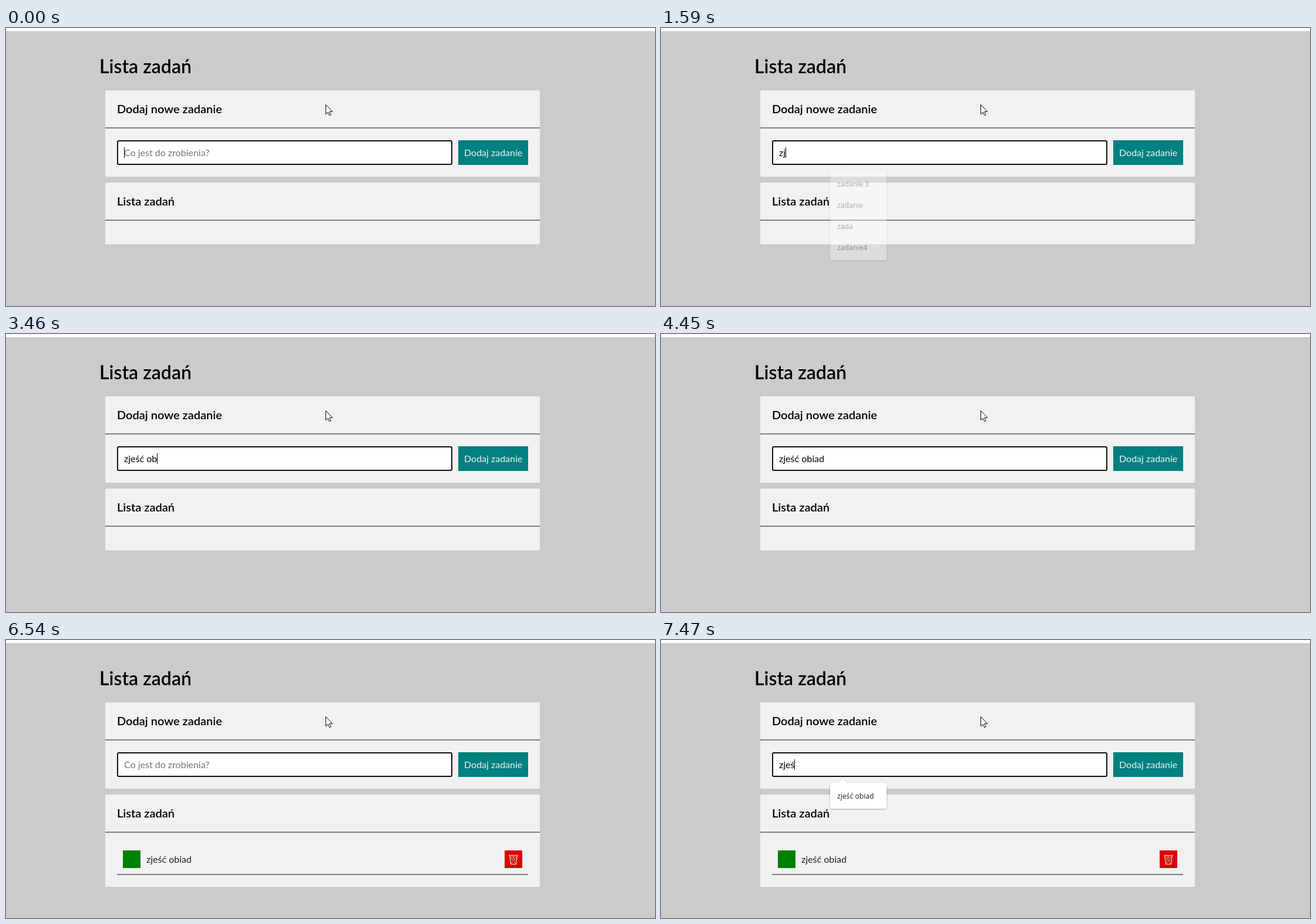
An HTML page for the animation above (8 s loop, 1105 by 473 pixels).

```html
<!DOCTYPE html>
<html lang="pl">
<head>
<meta charset="utf-8">
<title>Lista zadań</title>
<style>
  html, body { margin: 0; width: 100%; height: 100%; overflow: hidden; background: #cbcbc9; }
  svg { display: block; width: 1105px; height: 473px; }
  text { font: 16px Lato, sans-serif; white-space: pre; }
  .head { font-weight: 600; font-size: 20px; }
  .title { font-size: 32px; }
  .card { fill: #f1f1f1; }
  .line { fill: #808080; }
  .menu { filter: drop-shadow(0 1px 1.5px rgba(0, 0, 0, .32)); }
  .menu path, .menu rect { fill: #fff; }
  #items text { font: 12.2px "Open Sans", "Noto Sans", sans-serif; fill: #222; }
</style>
</head>
<body>
<svg viewBox="0 0 1105 473">
  <rect width="1105" height="473" fill="#cbcbc9"/>
  <rect width="1105" height="5" fill="#fff"/>
  <rect y="5" width="1105" height="1" fill="#dededd"/>
  <text class="head title" x="159" y="77">Lista zadań</text>

  <rect class="card" x="169" y="106" width="740" height="147" rx="2"/>
  <text class="head" x="189" y="145">Dodaj nowe zadanie</text>
  <rect class="line" x="169" y="169" width="740" height="2"/>
  <rect x="190" y="192" width="569" height="40" rx="2" fill="#fff" stroke="#101010" stroke-width="2"/>
  <text id="hint" x="201" y="218" fill="#757575">Co jest do zrobienia?</text>
  <text id="typed" x="201" y="218"></text>
  <rect id="caret" y="203" width="1" height="18"/>
  <rect x="770" y="191" width="119" height="42" fill="#008080"/>
  <text x="780" y="218" fill="#f1f1f1">Dodaj zadanie</text>

  <rect id="list" class="card" x="169" y="263" width="740" height="105" rx="2"/>
  <text class="head" x="189" y="302">Lista zadań</text>
  <rect class="line" x="169" y="326" width="740" height="2"/>
  <g id="task">
    <rect x="199" y="358" width="30" height="30" fill="#008000"/>
    <text x="239" y="379" fill="#222">zjeść obiad</text>
    <rect x="849" y="358" width="30" height="30" fill="#dd0000"/>
    <g fill="none" stroke="#d3b9a8">
      <path d="M856 366.5h16M857.5 367l2 14.5h9l2-14.5" stroke-width="1.3"/>
      <path d="M858 368l10 12M862 367l7 9M866 367l4 5M870 368l-10 12M866 367l-7 9M862 367l-4 5M859 378l3 3M869 378l-3 3" stroke-width=".9"/>
    </g>
    <rect class="line" x="189" y="398" width="700" height="2"/>
  </g>

  <g id="menu" class="menu">
    <path d="M301 243.5l8.5-8 8.5 8z"/>
    <rect id="panel" x="288" y="243" width="96" rx="3"/>
    <g id="items"></g>
  </g>

  <path d="M544.5 130.5v16.2l3.7-3.5 2.5 5.6 2.5-1.1-2.5-5.4h5.1z" fill="#fff" stroke="#000"/>
</svg>
<script>
const LOOP = 8000;
const TASK = "zjeść obiad";
const OLD = ["zadanie 3", "zadanie", "zada", "zadanie4"];
const ALL = [...OLD, TASK];
const ADDED_AT = 4870;

// [start ms, typed letters, caret shown, suggestions, menu opacity]
const STEPS = [
  [0, 0, 1], [470, 0, 0], [990, 0, 1],
  [1400, 1, 1, OLD, 1], [1520, 2, 1, OLD, .7], [1590, 2, 1, OLD, .35],
  [1660, 2, 1], [1730, 3, 1],
  [2190, 4, 1], [2250, 5, 1], [2860, 5, 0], [2910, 6, 1], [3180, 7, 1],
  [3460, 8, 1], [3580, 9, 1], [3720, 10, 1], [3910, 11, 1], [4450, 11, 0],
  [ADDED_AT, 0, 0], [5020, 0, 1], [5450, 0, 0], [6000, 0, 1], [6540, 0, 0],
  [6800, 1, 1, ALL, 1], [6860, 2, 1, [TASK], 1],
  [7060, 3, 1, [TASK], 1], [7470, 4, 1, [TASK], 1]
];

const el = id => document.getElementById(id);
const show = (id, on) => { el(id).style.display = on ? "" : "none"; };

function drawMenu(names, opacity) {
  show("menu", names.length);
  el("menu").style.opacity = opacity;
  el("panel").setAttribute("height", 8 + 36 * names.length);
  el("items").innerHTML = names
    .map((name, i) => `<text x="300" y="${270 + 36 * i}">${name}</text>`).join("");
}

function draw([start, count, caretOn, names = [], opacity = 1]) {
  const typed = el("typed");
  typed.textContent = TASK.slice(0, count);
  show("hint", !count);
  show("caret", caretOn);
  const width = count ? typed.getComputedTextLength() : 0;
  el("caret").setAttribute("x", Math.round(201 + width));
  const added = start >= ADDED_AT;
  show("task", added);
  el("list").setAttribute("height", added ? 157 : 105);
  drawMenu(names, opacity);
}

let current;
function tick() {
  const t = performance.now() % LOOP;
  const step = STEPS.findLast(s => s[0] <= t);
  if (step !== current) draw(current = step);
  requestAnimationFrame(tick);
}
tick();
</script>
</body>
</html>
```
